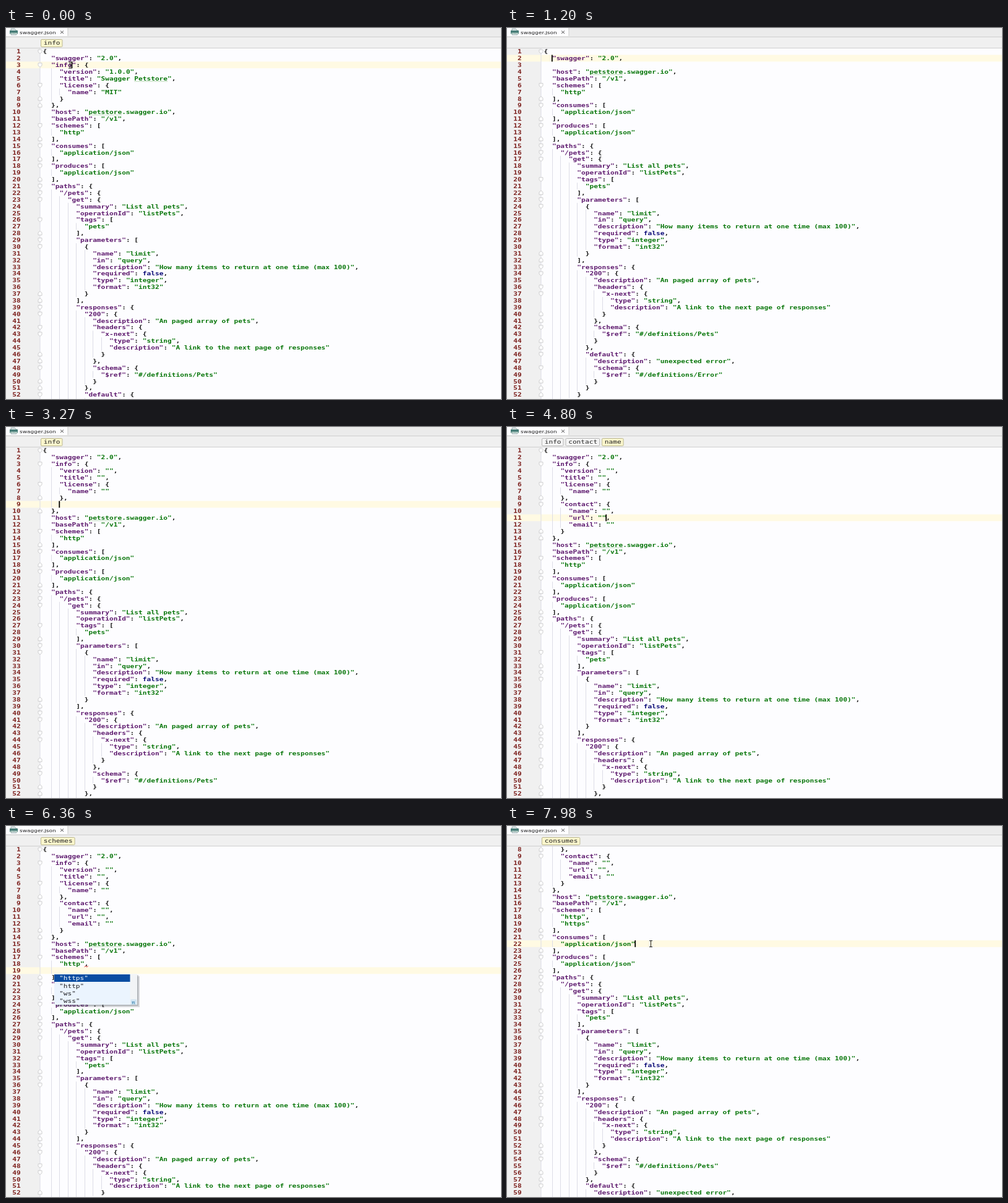
Write an HTML page with a canvas that moves like this. It is 800 px wide and 600 px high and loops after 8 s.

```html
<!DOCTYPE html>
<html lang="en">
<head>
<meta charset="utf-8">
<title>swagger.json</title>
<style>
  html, body { margin: 0; width: 100%; height: 100%; overflow: hidden; background: #fdfdff; }
  canvas { display: block; width: 800px; height: 600px; }
</style>
</head>
<body>
<canvas id="stage" width="800" height="600"></canvas>
<script>
const ctx = document.getElementById('stage').getContext('2d');
const LOOP = 8000, CHAR = 6.72, ROW = 10.88, LEFT = 59.5, TOP = 38, FOLD = 55;
const SQUASH = 0.85;
const MONO = '11.16px "DejaVu Sans Mono", monospace';
const BOLD = 'bold ' + MONO;
const SANS = '9px "DejaVu Sans", sans-serif';
const COLOR = {
  paper: '#fdfdff', bar: '#f0f0f0', caretRow: '#fffae3', line: '#cfcfcf', guide: '#dcdce6',
  number: '#7c1f1c', key: '#5e1a6e', string: '#08760a', word: '#0c0c78', mark: '#1a1a1a'
};

const filledInfo = `  "info": {
    "version": "1.0.0",
    "title": "Swagger Petstore",
    "license": {
      "name": "MIT"
    }
  },`;
const emptyInfo = filledInfo.replace(/: "[^"]*"/g, ': ""');
const commaInfo = emptyInfo.replace('    }\n', '    },\n');
const addToInfo = text => commaInfo.replace(/ {2}},$/, text + '\n  },');
const contactInfo = addToInfo(`    "contact": {
      "name": "",
      "url": "",
      "email": ""
    }`);

const buildLines = ({ info, schemes }) => `{
  "swagger": "2.0",
${info}
  "host": "petstore.swagger.io",
  "basePath": "/v1",
  "schemes": [
    "http"${schemes}
  ],
  "consumes": [
    "application/json"
  ],
  "produces": [
    "application/json"
  ],
  "paths": {
    "/pets": {
      "get": {
        "summary": "List all pets",
        "operationId": "listPets",
        "tags": [
          "pets"
        ],
        "parameters": [
          {
            "name": "limit",
            "in": "query",
            "description": "How many items to return at one time (max 100)",
            "required": false,
            "type": "integer",
            "format": "int32"
          }
        ],
        "responses": {
          "200": {
            "description": "An paged array of pets",
            "headers": {
              "x-next": {
                "type": "string",
                "description": "A link to the next page of responses"
              }
            },
            "schema": {
              "$ref": "#/definitions/Pets"
            }
          },
          "default": {
            "description": "unexpected error",
            "schema": {
              "$ref": "#/definitions/Error"
            }
          }
        }
      },`.split('\n');

// Each step overrides part of the editor state; caret is [line, column].
const steps = [
  [0, { info: filledInfo, schemes: '', caret: [3, 7], crumbs: ['info'] }],
  [840, { info: '', caret: [3, 2], crumbs: [] }],
  [1170, { caret: [2, 2] }],
  [1410, { caret: [3, 2] }],
  [1890, { info: emptyInfo, caret: [4, 16] }],
  [2100, { crumbs: ['info', 'version'] }],
  [2400, { caret: [5, 14], crumbs: ['info', 'title'] }],
  [2520, { caret: [6, 16], crumbs: ['info', 'license'] }],
  [2640, { caret: [7, 16], crumbs: ['info', 'license', 'name'] }],
  [2760, { caret: [8, 5], crumbs: ['info', 'license'] }],
  [2880, { info: commaInfo, caret: [8, 6], crumbs: ['info'] }],
  [3030, { info: addToInfo(''), caret: [9, 4] }],
  [4020, { info: contactInfo, caret: [10, 15] }],
  [4230, { crumbs: ['info', 'contact', 'name'] }],
  [4740, { caret: [11, 15] }],
  [4890, { caret: [12, 15], crumbs: ['info', 'contact', 'email'] }],
  [4980, { caret: [13, 5], crumbs: ['info', 'contact'] }],
  [5070, { caret: [14, 4], crumbs: ['info'] }],
  [5160, { caret: [15, 15], crumbs: ['host'] }],
  [5250, { caret: [16, 15], crumbs: ['basePath'] }],
  [5340, { caret: [17, 14], crumbs: ['schemes'] }],
  [5430, { caret: [18, 10] }],
  [5610, { schemes: ',', caret: [18, 11] }],
  [5820, { schemes: ',\n', caret: [19, 4] }],
  [6090, { popup: true }],
  [6690, { schemes: ',\n    "https"', caret: [19, 11], popup: false }],
  [7590, { caret: [22, 22], crumbs: ['consumes'] }]
];

function stateAt(time) {
  const state = { caretTime: 0 };
  for (const [start, change] of steps) {
    if (start > time) break;
    Object.assign(state, change);
    if (change.caret) state.caretTime = start;
  }
  return state;
}

const ease = (time, from, to) => {
  const p = Math.min(1, Math.max(0, (time - from) / (to - from)));
  return p * p * (3 - 2 * p);
};

function rect(x, y, w, h, fill) {
  ctx.fillStyle = fill;
  ctx.fillRect(x, y, w, h);
}

function path(points, stroke, fill) {
  ctx.beginPath();
  points.forEach(([x, y]) => ctx.lineTo(x, y));
  if (fill) {
    ctx.closePath();
    ctx.fillStyle = fill;
    ctx.fill();
  }
  ctx.strokeStyle = stroke;
  ctx.stroke();
}

// y is the middle of the capitals
function text(string, x, y, color, font = BOLD, align = 'left') {
  ctx.save();
  ctx.translate(x, y + 3.4);
  ctx.scale(1, SQUASH);
  ctx.font = font;
  ctx.textAlign = align;
  ctx.fillStyle = color;
  ctx.fillText(string, 0, 0);
  ctx.restore();
}

function tokenColor(token, next) {
  if (token[0] === '"') return next === ':' ? COLOR.key : COLOR.string;
  return token === 'false' ? COLOR.word : COLOR.mark;
}

function drawCode(line, y) {
  for (const { 0: token, index } of line.matchAll(/"[^"]*"|false|[^\s"]+/g)) {
    text(token, LEFT + index * CHAR, y, tokenColor(token, line[index + token.length]));
  }
  const typo = line.search(/petstore/i);
  if (typo >= 0) rect(LEFT + typo * CHAR, y + 4.5, 8 * CHAR, 0.8, '#b4d8b0');
}

function drawFold(y, direction) {
  const shape = [[-3, -3], [3, -3], [3, 1], [0, 3.5], [-3, 1]];
  path(shape.map(([dx, dy]) => [FOLD + dx, y + dy * direction]), COLOR.line, COLOR.paper);
}

function drawStructure(lines, rowY) {
  const open = [];
  const guide = ({ row, indent }, end) => {
    if (!indent) return;
    const x = Math.round(LEFT + indent * CHAR) + 0.5;
    path([[x, rowY(row) + ROW / 2], [x, rowY(end) - ROW / 2]], COLOR.guide);
  };
  lines.forEach((line, row) => {
    if (/[{[]$/.test(line)) {
      open.push({ row, indent: line.search(/\S/) });
      drawFold(rowY(row), 1);
    } else if (/^\s*[}\]]/.test(line)) {
      guide(open.pop(), row);
      drawFold(rowY(row), -1);
    }
  });
  open.forEach(block => guide(block, lines.length));
}

function drawPopup() {
  rect(82, 243, 134, 50, 'rgba(70,75,85,.2)');
  rect(80, 241, 134, 50, 'rgba(70,75,85,.25)');
  rect(78, 239.5, 134, 49.5, '#ebf4fe');
  rect(200.5, 240, 11.5, 49, '#f2f4f6');
  rect(78, 240, 122.5, 12, '#0a4da2');
  ['"https"', '"http"', '"ws"', '"wss"'].forEach((item, i) =>
    text(item, 86, 246 + i * 12.1, i ? '#1c1c20' : '#ffffff', MONO));
  rect(201.5, 280.5, 9.5, 8.5, '#cfe4f2');
  text('π', 203, 285, '#2878a8', SANS);
}

function drawHeader(crumbs) {
  rect(0, 0, 800, 33, COLOR.bar);
  rect(0, 0, 800, 14, '#ebebeb');
  rect(0, 0, 99.5, 13, COLOR.paper);
  rect(99.5, 0, 1, 13, COLOR.line);
  rect(0, 14, 800, 1, COLOR.line);
  rect(0, 32, 800, 1, COLOR.line);

  path([[8, 1.5], [14, 1.5], [17, 4], [17, 11], [8, 11]], '#92a4a8', '#e6eeee');
  rect(6, 4, 13, 5.5, '#477d78');
  text('JSON', 7, 6.2, '#f0f8ee', 'bold 4px "DejaVu Sans", sans-serif');
  text('swagger.json', 22, 6.5, '#202020', SANS);
  path([[88, 4.5], [93, 9]], '#4c4c4c');
  path([[93, 4.5], [88, 9]], '#4c4c4c');

  let x = 56;
  crumbs.forEach((crumb, i) => {
    const width = crumb.length * CHAR + 8.6;
    const current = i === crumbs.length - 1;
    ctx.fillStyle = current ? '#fbf6cc' : '#f5f5f5';
    ctx.strokeStyle = current ? '#bdb992' : '#b8b8b8';
    ctx.beginPath();
    ctx.roundRect(x + 0.5, 18.5, width - 1, 12, 1.5);
    ctx.fill();
    ctx.stroke();
    text(crumb, x + 4.7, 24, '#242424', MONO);
    x += width + 3;
  });
}

function drawPointer(x, y) {
  const ink = '#202020';
  path([[x, y - 4.5], [x, y + 4.5]], ink);
  for (const end of [-5, 5]) path([[x - 2.5, y + end], [x + 2.5, y + end]], ink);
}

function draw(time) {
  const state = stateAt(time);
  const lines = buildLines(state);
  const scroll = 7 * ROW * ease(time, 6930, 7410);
  const rowY = row => TOP + row * ROW - scroll;
  const [caretLine, caretColumn] = state.caret;
  const caretY = rowY(caretLine - 1);

  ctx.lineWidth = 1;
  rect(0, 0, 800, 600, COLOR.paper);
  rect(0, 0, FOLD, 600, COLOR.bar);
  rect(0, caretY - ROW / 2, 800, ROW, COLOR.caretRow);
  rect(FOLD - 0.5, 33, 1, 567, COLOR.guide);

  drawStructure(lines, rowY);
  lines.forEach((line, row) => {
    const y = rowY(row);
    if (y < 25 || y > 610) return;
    text(row + 1, 23.7, y, COLOR.number, BOLD, 'right');
    drawCode(line, y);
  });

  // a trailing comma is an error until the next value arrives
  if (/^,\s*$/.test(state.schemes)) {
    const x = LEFT + 10 * CHAR, y = rowY(17) + 5;
    path([[x, y], [x + 2, y - 1.5], [x + 4, y], [x + 6, y - 1.5]], '#e02818');
  }
  if ((time - state.caretTime) % 1000 < 500) {
    rect(LEFT + caretColumn * CHAR - 1, caretY - 5.4, 1.8, ROW, '#000');
  }
  if (state.popup) drawPopup();
  drawHeader(state.crumbs);

  if (time < 840) drawPointer(103.5, 60);
  else if (time >= 6900) {
    const p = ease(time, 6900, 7530);
    drawPointer(103.5 + 129 * p, 60 + 130.5 * p);
  }
}

function tick() {
  draw(performance.now() % LOOP);
  requestAnimationFrame(tick);
}
tick();
</script>
</body>
</html>
```
